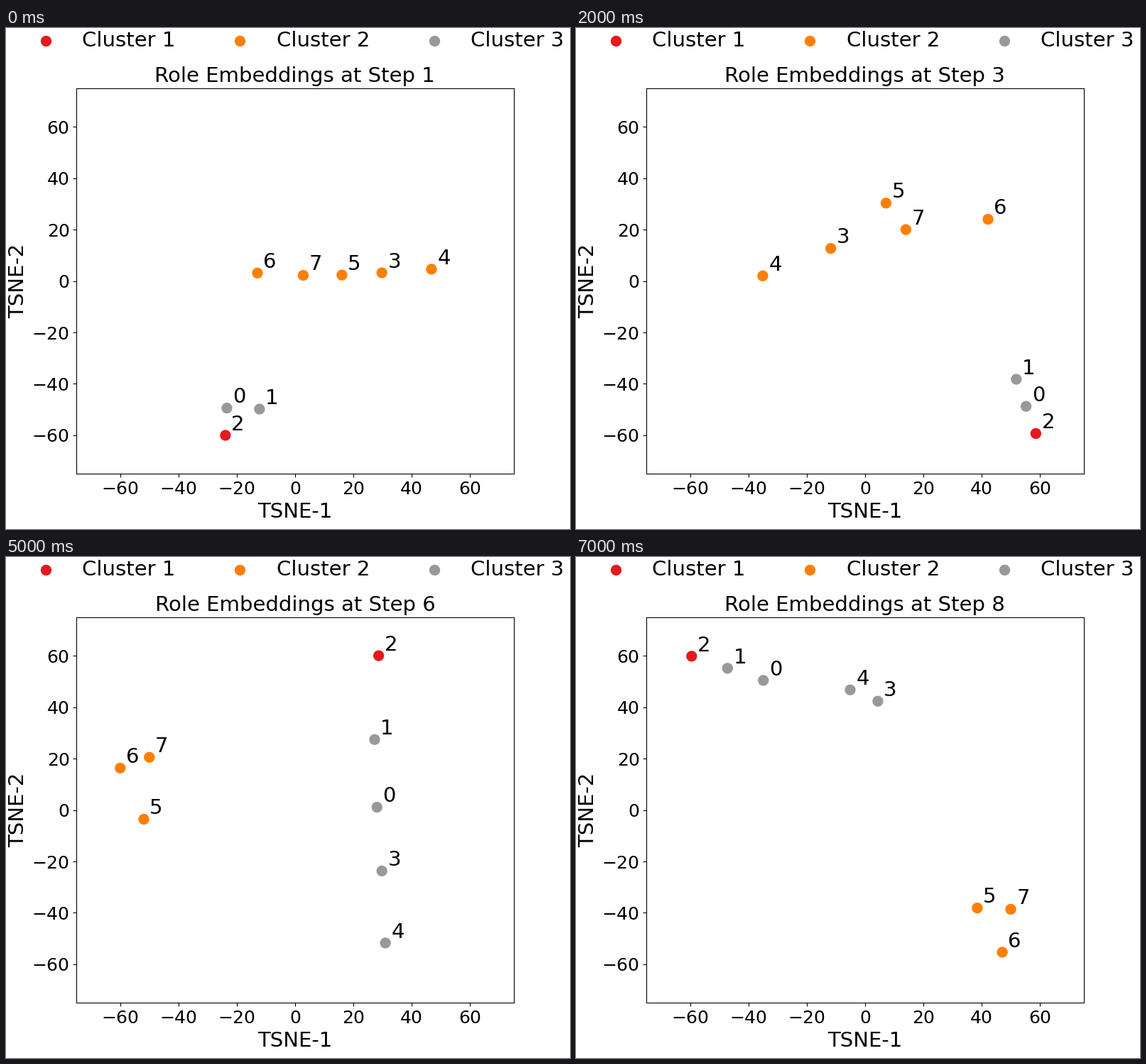
Recreate the animation shown at these times as a matplotlib script. Size 794 by 706 pixels, loop 8 s.

```python
import numpy as np
import matplotlib.pyplot as plt
from matplotlib.animation import FuncAnimation

W, H, DPI = 794, 706, 100
BIG, SMALL, DOT = 21, 18, 100
REACH = 60
COLORS = np.array(["#e41a1c", "#ff7f00", "#999999"])
LABEL_SHIFT = 2

# Cluster index of roles 0 to 7
EARLY, LATE, MIXED = "22011111", "22022111", "10211000"


def place(**chains):
    """Spread each chain of roles along a smooth curve through its key points."""
    spots = np.zeros(8, complex)
    for name, keys in chains.items():
        roles = [int(c) for c in name[1:]]
        knots = np.round(np.linspace(0, len(roles) - 1, len(keys)))
        curve = np.polyfit(knots, keys, len(keys) - 1)
        spots[roles] = np.polyval(curve, np.arange(len(roles)))
    return spots


def halfway(a, b, turn):
    """Midpoint of bent paths from a to b, scaled to the usual reach."""
    mid = (a + b) / 2 + 1j * turn * (b - a) / 2
    return mid * REACH / max(abs(mid.real).max(), abs(mid.imag).max())


row = place(r201=[-23.9-60j, -23.4-49.4j, -12.2-49.8j],
            r67534=[-12.9+3.1j, 2.8+2.2j, 29.8+3.2j, 46.8+4.6j])
slope = place(r201=[58.6-59.3j, 51.9-38.2j],
              r4376=[-35.1+2j, 14+20j, 42.2+24j],
              r5=[7.2+30.3j])
hook = place(r201=[59.3-31.3j, 45.8-8j],
             r43576=[-17+26.7j, 3.2+30.3j, 17+55.6j, 3.6+60j])
column = place(r21034=[28.7+60j, 27.3+27.4j, 29.8-23.7j, 31-51.7j],
               r576=[-51.9-3.6j, -50+20.5j, -60+16.3j])
ramp = place(r43012=[-60+23.1j, -52.4+25.3j, -32+31.8j, -23.7+37j],
             r576=[4.2+2.4j, 11.5+2.4j, 11.9-10.2j])
corners = place(r210=[-59.5+59.8j, -34.9+50.4j],
                r43=[-5.1+46.7j, 4.4+42.3j],
                r576=[38.5-38.1j, 50-38.6j, 47.1-55.3j])

STEPS = [
    (EARLY, row), (EARLY, halfway(row, slope, 0.3)),
    (EARLY, slope), (EARLY, hook),
    (LATE, halfway(hook, column, -0.3)), (LATE, column),
    (MIXED, ramp), (LATE, corners),
]

plt.rcParams["font.family"] = "DejaVu Sans"
fig, ax = plt.subplots(figsize=(W / DPI, H / DPI), dpi=DPI)
ax.set(xlim=(-75, 75), ylim=(-75, 75))
ticks = range(-REACH, REACH + 1, 20)
ax.set_xticks(ticks)
ax.set_yticks(ticks)
ax.tick_params(labelsize=SMALL)
ax.set_xlabel("TSNE-1", fontsize=BIG)
ax.set_ylabel("TSNE-2", fontsize=BIG)
title = ax.set_title("", fontsize=BIG)

# Legend row, laid out in pixels from the top left corner
page = fig.add_axes([0, 0, 1, 1])
page.set(xlim=(0, W), ylim=(H, 0))
page.axis("off")
for i, color in enumerate(COLORS):
    x = 56.2 + 273.2 * i
    page.scatter(x, 17.6, s=DOT, color=color)
    page.text(x + 51.2, 26, f"Cluster {i + 1}", fontsize=BIG)

dots = ax.scatter(np.zeros(8), np.zeros(8), s=DOT, zorder=2)
labels = [ax.text(0, 0, str(i), fontsize=BIG) for i in range(8)]


def draw(step):
    clusters, spots = STEPS[step]
    title.set_text(f"Role Embeddings at Step {step + 1}")
    dots.set_offsets(np.column_stack([spots.real, spots.imag]))
    dots.set_color(COLORS[[int(c) for c in clusters]])
    for label, spot in zip(labels, spots):
        label.set_position((spot.real + LABEL_SHIFT, spot.imag + LABEL_SHIFT))
    return [title, dots, *labels]


anim = FuncAnimation(fig, draw, frames=len(STEPS), interval=1000,
                     repeat=True, repeat_delay=0, blit=False)
plt.show()
```
